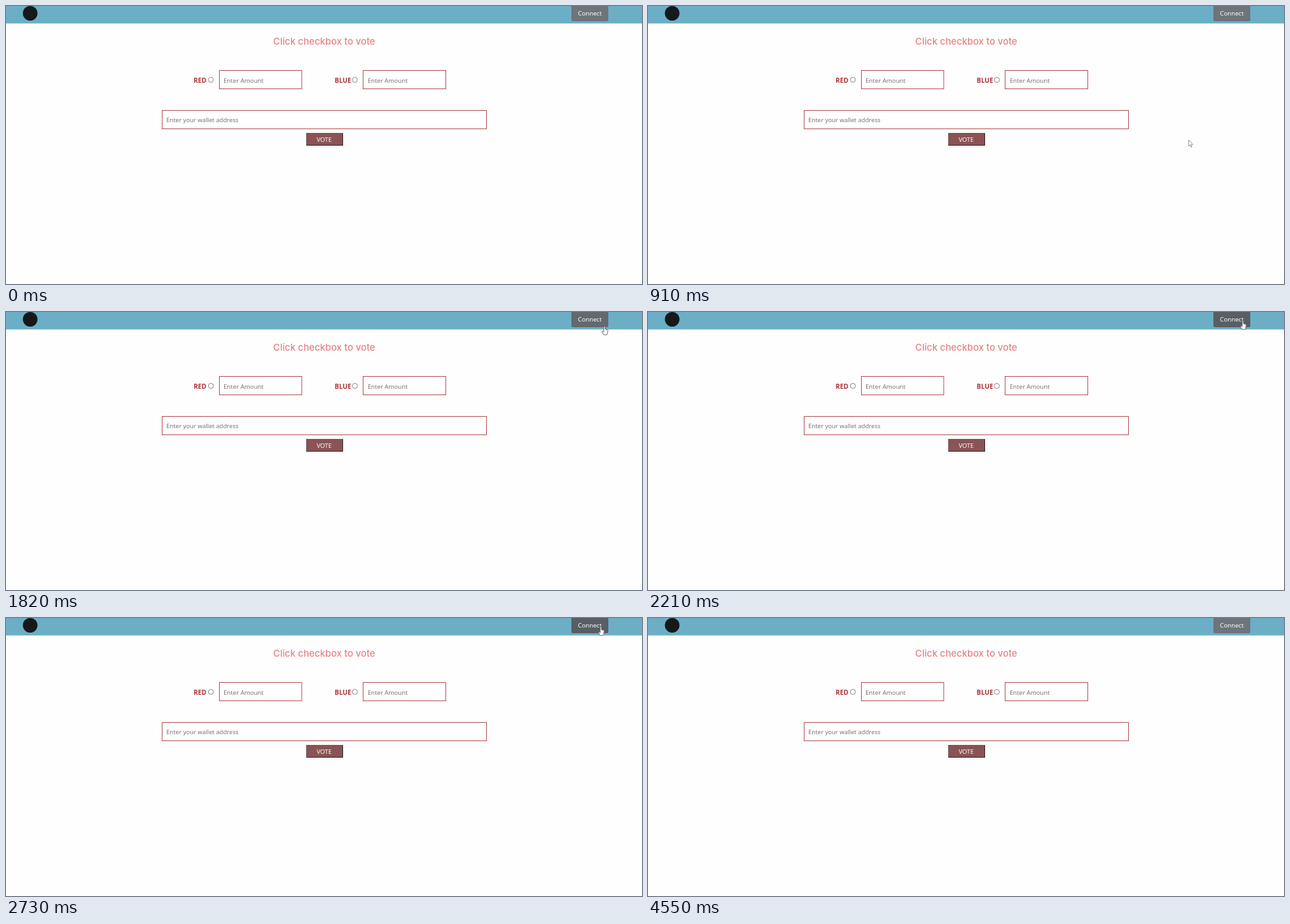
An HTML page for the animation above (8 s loop, 1000 by 438 pixels).

```html
<!DOCTYPE html>
<html lang="en">
<head>
<meta charset="utf-8">
<title>Vote</title>
<style>
  html, body { margin: 0; width: 100%; height: 100%; overflow: hidden; background: #fefefe; }
  svg { display: block; width: 100%; height: 100%; }
  text { font: 9.65px "Noto Sans", "Open Sans", sans-serif; fill: #757575; }
  .title { font: 500 14.8px Inter, sans-serif; fill: #e88384; text-anchor: middle; }
  .choice { font-weight: 600; font-size: 10.2px; fill: #ab3234; }
  .wallet { font-size: 9.52px; }
  .light { fill: #fff; text-anchor: middle; }
  .field { fill: #fff; stroke: #b04a4c; }
  .radio { fill: #fff; stroke: #777; stroke-width: .9; }

  .connect, .pointer, .arrow, .hand { animation: 8s step-end infinite; }
  .connect { fill: #6d747a; animation-name: hover; }
  .pointer { animation-name: move; }
  .arrow { fill: #fff; stroke: #777; stroke-width: .8; stroke-linejoin: round; animation-name: arrow; }
  .hand { fill: #fff; stroke: #444; stroke-width: .8; stroke-linejoin: round; animation-name: hand; }

  @keyframes move {
    0%, 4.875% { transform: translate(802px, 325px); }
    6.5% { transform: translate(838.8px, 230.5px); }
    11.375% { transform: translate(850px, 211px); }
    13% { transform: translate(886px, 138px); }
    14.625% { transform: translate(919px, 68px); }
    16.25% { transform: translate(933.8px, 35.5px); }
    19.5% { transform: translate(936px, 32px); }
    21.125% { transform: translate(939px, 27px); }
    22.75% { transform: translate(941px, 22px); }
    24.375% { transform: translate(939px, 18px); }
    26% { transform: translate(937px, 15px); }
    27.625%, 34.125%, 100% { transform: translate(935.3px, 13.5px); }
    29.25% { transform: translate(940px, 14px); }
    30.875% { transform: translate(944px, 15px); }
    32.5% { transform: translate(940px, 14px); }
  }
  @keyframes arrow {
    0%, 22.75%, 100% { opacity: 0; }
    4.875% { opacity: 1; }
  }
  @keyframes hand {
    0%, 56.875%, 100% { opacity: 0; }
    22.75% { opacity: 1; }
  }
  @keyframes hover {
    0%, 40.625%, 100% { fill: #6d747a; }
    22.75% { fill: #62696f; }
    24.375% { fill: #585e63; }
    39% { fill: #636a70; }
  }
</style>
</head>
<body>
<svg viewBox="0 0 1000 438" preserveAspectRatio="none">
  <rect width="1000" height="438" fill="#fefefe"/>
  <rect width="1000" height="27.500" fill="#6caec6"/>
  <circle cx="38" cy="11.500" r="11.500" fill="#15191c"/>

  <path class="connect" d="M889 0H947V21.500Q947 24 944.500 24H891.500Q889 24 889 21.500Z"/>
  <text class="light" x="918" y="15.300">Connect</text>

  <text class="title" x="500.300" y="61">Click checkbox to vote</text>

  <text class="choice" x="295" y="120.500">RED</text>
  <circle class="radio" cx="322.200" cy="116.400" r="4"/>
  <rect class="field" x="335.500" y="101.500" width="129.500" height="29"/>
  <text x="342" y="120.500">Enter Amount</text>

  <text class="choice" x="516.800" y="120.500">BLUE</text>
  <circle class="radio" cx="548.500" cy="116.400" r="4"/>
  <rect class="field" x="561.500" y="101.500" width="130" height="29"/>
  <text x="568.700" y="120.500">Enter Amount</text>

  <rect class="field" x="245.500" y="164.500" width="510" height="29"/>
  <text class="wallet" x="252" y="183.300">Enter your wallet address</text>

  <rect x="472" y="200" width="58" height="20" fill="#8a5355"/>
  <g fill="none">
    <path d="M472.500 219.500V200.500H529.500" stroke="#665556"/>
    <path d="M472.500 219.500H529.500V200.500" stroke="#2c2425"/>
  </g>
  <text class="light" x="500.200" y="213.800">VOTE</text>

  <g class="pointer">
    <path class="arrow" d="M0 0V9.800L2.200 7.800L3.800 11.400L5.300 10.700L3.700 7.300H6.700Z"/>
    <path class="hand" d="M-1.100 .8Q0 -.7 1.100 .8V5L4.500 5.700Q5.400 6 5.300 7.200L4.500 11.800L3.600 14H-1.200L-3.700 9.700Q-4.300 8 -2.600 8.200L-1.100 9.500Z"/>
  </g>
</svg>
</body>
</html>
```
